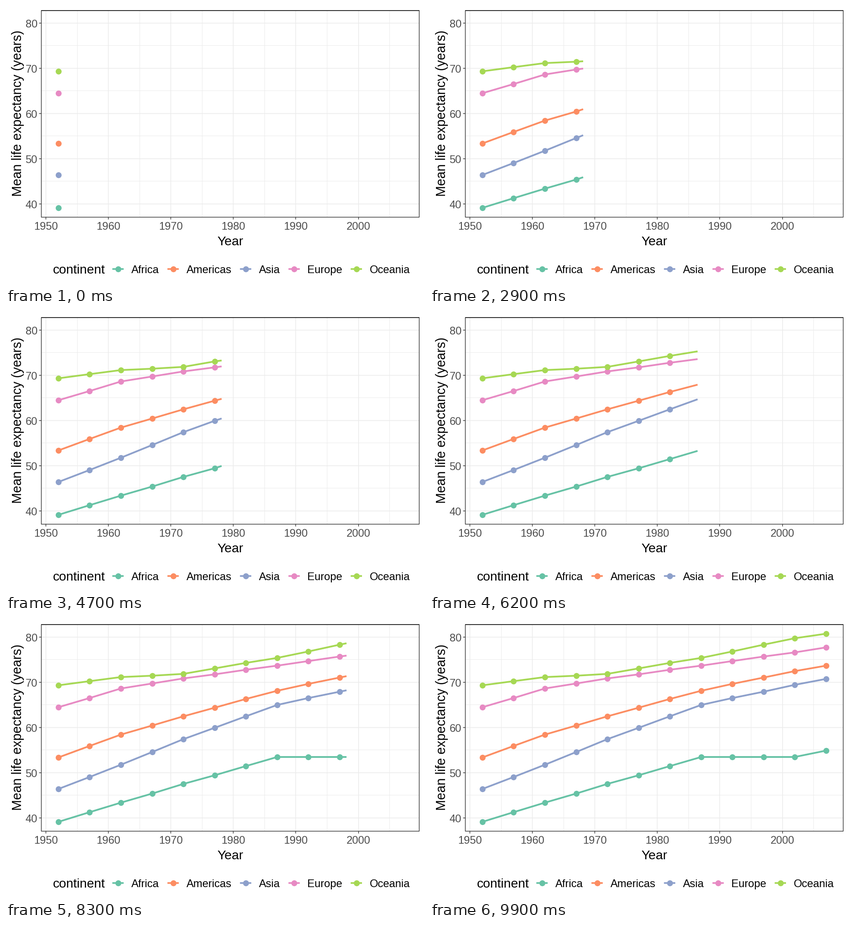
A matplotlib script that plays this animation: 917 px wide and 611 px high, repeating every 10000 ms.

```python
import numpy as np
import matplotlib.pyplot as plt
from matplotlib.animation import FuncAnimation

W, H, DPI = 917, 611, 64
PX = 72 / DPI  # points per pixel
FRAMES, STEP = 100, 9  # nine frames between two surveys

plt.rcParams["font.family"] = "Liberation Sans"

# Life expectancy at the years where the trends bend
BENDS = [1952, 1962, 1972, 1987, 2002, 2007]
TRENDS = {
    "Africa": ("#66C2A5", [39.14, 43.32, 47.45, 53.45, 53.45, 54.81]),
    "Americas": ("#FC8D62", [53.30, 58.43, 62.43, 68.13, 72.42, 73.60]),
    "Asia": ("#8DA0CB", [46.36, 51.70, 57.35, 64.95, 69.38, 70.73]),
    "Europe": ("#E78AC3", [64.43, 68.60, 70.80, 73.65, 76.62, 77.65]),
    "Oceania": ("#A6D854", [69.26, 71.08, 71.85, 75.38, 79.72, 80.72]),
}
YEARS = np.arange(1952, 2008, 5)
LEFT, RIGHT, TOP, BOTTOM = 77.5, 906.5, 10, 462.5


def to_x(year):
    return 87.5 + (np.asarray(year) - 1950) * 13.71


def to_y(age):
    return 37.1 + (80 - np.asarray(age)) * 9.9


fig = plt.figure(figsize=(W / DPI, H / DPI), dpi=DPI, facecolor="white")
ax = fig.add_axes([0, 0, 1, 1])
ax.set(xlim=(0, W), ylim=(H, 0))
ax.axis("off")


def line(x, y, color, width, z=1):
    return ax.plot(x, y, color=color, lw=width * PX, zorder=z, snap=False,
                   solid_capstyle="butt", solid_joinstyle="round")[0]


def dots(x, y, color):
    return ax.plot(x, y, "o", color=color, ms=13 * PX, mew=0, zorder=6)[0]


def label(x, y, text, size, color="black", ha="left", **kw):
    return ax.text(x, y, text, fontsize=size * PX, color=color, ha=ha,
                   va="baseline", **kw)


def grid(years, ages, width, z):
    for x in np.floor(to_x(years)) + 0.5:
        line([x, x], [TOP, BOTTOM], "#EBEBEB", width, z)
    for y in np.floor(to_y(ages)) + 0.5:
        line([LEFT, RIGHT], [y, y], "#EBEBEB", width, z)


decades, ages = range(1950, 2001, 10), range(40, 81, 10)
grid(range(1955, 2006, 10), range(45, 76, 10), 1.0, 1)
grid(decades, ages, 1.5, 2)

# Panel border, ticks and axis text
line([LEFT, RIGHT, RIGHT, LEFT, LEFT, RIGHT],
     [TOP, TOP, BOTTOM, BOTTOM, TOP, TOP], "#333333", 1.4, 7)
for year in decades:
    x = np.floor(to_x(year)) + 0.5
    line([x, x], [BOTTOM, BOTTOM + 5], "#333333", 1.4)
    label(x, 490.5, str(year), 23.7, "#4D4D4D", "center")
for age in ages:
    y = np.floor(to_y(age)) + 0.5
    line([LEFT - 5, LEFT], [y, y], "#333333", 1.4)
    label(69, y + 9.3, str(age), 23.7, "#4D4D4D", "right")
label(492.3, 524.5, "Year", 28.4, ha="center")
label(33.6, 234.5, "Mean life expectancy (years)", 28.5, ha="center",
      rotation=90, rotation_mode="anchor")

# Legend: each entry starts a fixed gap after the previous name
label(103, 586.5, "continent", 28.2)
x = 275
for name, (color, _) in TRENDS.items():
    mid = x - 29.3
    line([mid - 12.4, mid + 12.4], [576, 576], color, 3.6, 5)
    dots([mid], [576], color)
    x += label(x, 585.3, name, 23.7).get_window_extent().width + 60

trails = [line([], [], color, 3.8, 5) for color, _ in TRENDS.values()]
marks = [dots([], [], color) for color, _ in TRENDS.values()]


def update(i):
    now = 1952 + 55 * i / (FRAMES - 1)
    seen = YEARS[:i // STEP + 1]
    years = np.append(seen, now)
    for (_, ages), trail, mark in zip(TRENDS.values(), trails, marks):
        path = np.interp(years, YEARS, np.interp(YEARS, BENDS, ages))
        px, py = to_x(years), to_y(path)
        mark.set_data(px[:-1], py[:-1])
        # whole-pixel ends, as on a raster device
        trail.set_data(np.round(px), np.round(py))
    return trails + marks


anim = FuncAnimation(fig, update, frames=FRAMES, interval=100,
                     repeat=True, repeat_delay=0, blit=False)
plt.show()
```
